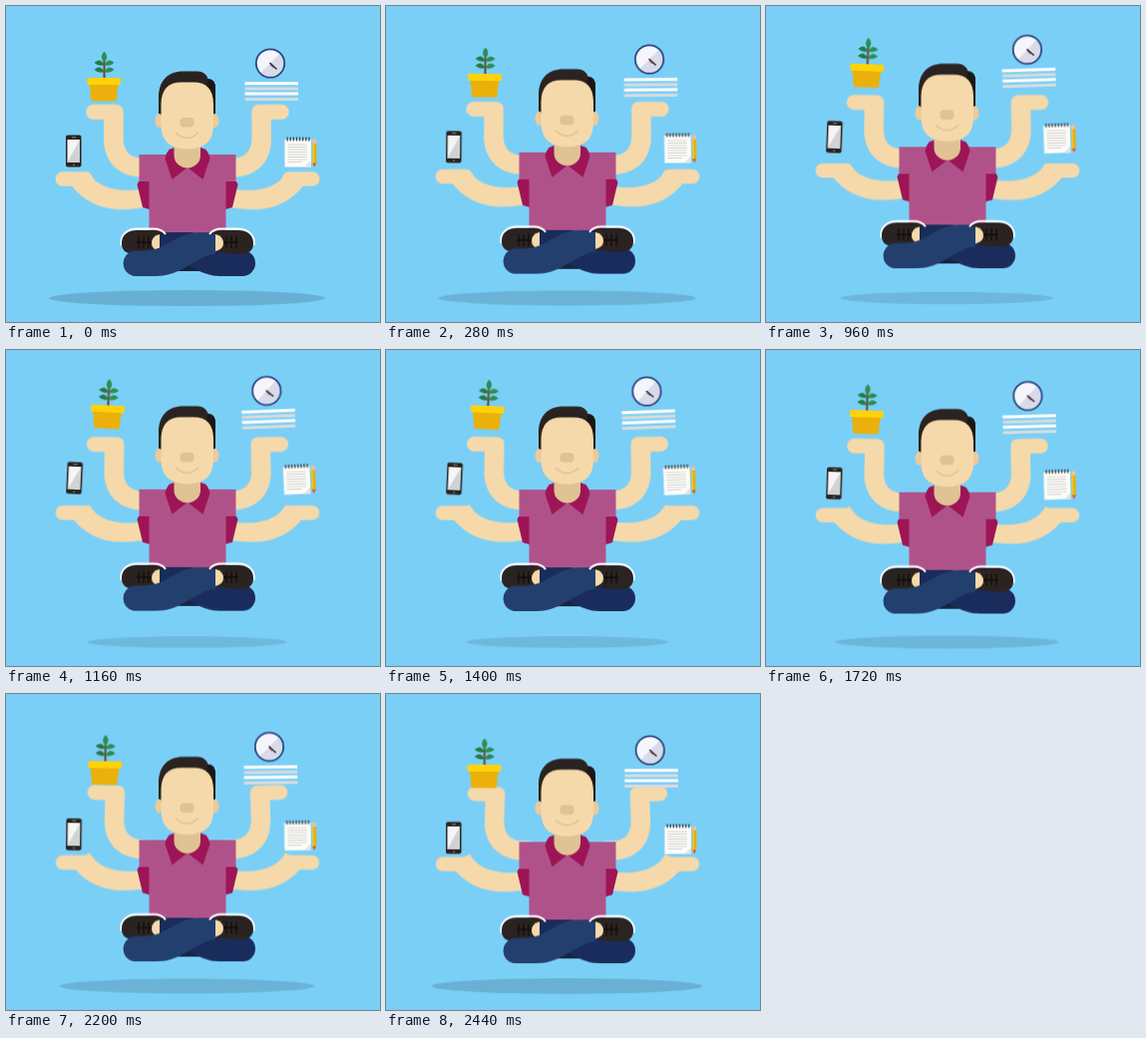
An HTML page without scripts for the animation above (2.52 s loop, 375 px wide and 317 px high).

```html
<!DOCTYPE html>
<html lang="en">
<head>
<meta charset="utf-8">
<title>Multitasking meditation</title>
<style>
  html, body { margin: 0; width: 100%; height: 100%; overflow: hidden; background: #7acff7; }
  svg { display: block; width: 375px; height: 317px; }

  .float { animation: float 1260ms linear infinite alternate; transform-origin: var(--pivot, 0 0); }
  @keyframes float {
    from { transform: none; }
    to { transform: translate(var(--x, 0px), var(--y, 0px)) rotate(var(--turn, 0deg)) scale(var(--size, 1)); opacity: var(--fade, 1); }
  }

  .shadow { --pivot: 181.5px 293px; --size: .7; --fade: .68; }
  .body { --y: -10px; }
  .upper { --pivot: 133px 160px; --turn: 3.8deg; }
  .lower { --pivot: 140px 190px; --turn: 3.8deg; }
  .hand { --x: .7px; --y: -5px; }
  .plant { --pivot: 98px 84px; --x: 3.6px; --y: -18px; --turn: 3.2deg; }
  .phone { --pivot: 68px 145px; --x: 1px; --y: -18.5px; --turn: 3deg; }
  .clock { --pivot: 265px 57.5px; --x: -4px; --y: -18px; --turn: -3deg; }
  .papers { --pivot: 266px 86px; --x: -3.2px; --y: -17.7px; --turn: -2.4deg; }
  .notes { --pivot: 295px 147px; --x: -1.2px; --y: -18.5px; --turn: -2.8deg; }

  .skin { fill: #f5d9aa; }
  .shade { fill: #e0c294; }
  .shirt { fill: #b0528a; }
  .trim { fill: #9d1556; }
  .dark { fill: #2b2321; }
</style>
</head>
<body>
<svg viewBox="0 0 375 317">
  <defs>
    <g id="arms">
      <path class="skin float upper" d="M87.5 99.5H110Q117.5 99.5 117.5 107V133C117.5 146 124 152 134 153H146V172H134C112 171 98 156 98 134V114.5H87.5A7.5 7.5 0 0 1 87.5 99.5Z"/>
      <path class="skin float lower" d="M83 168C93 184 112 189 146 183V201C108 210 82 203 65 180Z"/>
      <rect class="skin float hand" x="49.5" y="166.5" width="37.5" height="14.5" rx="7.25"/>
      <path class="trim" d="M133 176H144V204L137 202L131.5 179Z"/>
    </g>
    <path id="collar" class="trim" d="M169 142L163.500 144Q160 148 159.500 153L166.500 174L182 162Z"/>
    <g id="shoe">
      <path d="M115.500 240C114 229 122 223.500 132 223.500H148Q156 223.500 160 229" fill="none" stroke="#fff" stroke-width="2"/>
      <path class="dark" d="M116 238C116 229 123 225 131 225H148Q155 225 158 229H154V246Q142 249 130 249C120 249 116 245 116 238Z"/>
      <path d="M133 231V243M138 231V243M143 231V243M131 237H147" fill="none" stroke="#120e0d" stroke-width="1.300"/>
      <path class="skin" d="M154 229Q146 231 146 238Q146 244 154 246Z"/>
    </g>
    <path id="leaf" d="M98.500 66Q103 58 108.500 64Q104 68 98.500 66Z"/>
  </defs>

  <ellipse class="float shadow" cx="181.5" cy="293" rx="138.5" ry="8" fill="#69b0d3"/>

  <g class="float body">
    <use href="#arms"/>
    <use href="#arms" transform="matrix(-1 0 0 1 364 0)"/>
    <path class="shirt" d="M133.500 149H230.500V176H220.500V229H143.500V176H133.500Z"/>

    <path d="M168 258H198V266H168Z" fill="#17233f"/>
    <path d="M153 227H185C197 227 215 245 237 245A13 13 0 0 1 237 271H215C195 271 185 258 153 250Z" fill="#1a2c5b"/>
    <use href="#shoe"/>
    <path d="M210 227.500V249C200 249 190 257 180 262C170 268 160 271 150 271H128A13 13 0 0 1 128 245.500H138C160 245 165 233 185 228Q195 226.500 210 227.500Z" fill="#233f6e"/>
    <use href="#shoe" transform="matrix(-1 0 0 1 364 0)"/>

    <use href="#collar"/>
    <use href="#collar" transform="matrix(-1 0 0 1 364 0)"/>
    <path class="shade" d="M168.500 136H195V150A13.250 12.500 0 0 1 168.500 150Z"/>
    <path class="dark" d="M153 110V92C153 75 162 65.500 178 65.500H192Q200 65.500 202.500 73Q210 73 210 83V110Z"/>
    <path d="M202.500 73Q210 73 210 83V108H207V88Q205 82 201 80Z" fill="#1c1716"/>
    <ellipse cx="153.500" cy="115" rx="4" ry="7" fill="#ecca9a"/>
    <ellipse cx="209.500" cy="115" rx="4" ry="7" fill="#ecca9a"/>
    <path class="skin" d="M155.500 98Q156 76.500 176 76.500H188Q207.500 76.500 208 98V121Q207 143.500 182 143.500Q156.500 143.500 155.500 121Z"/>
    <rect class="shade" x="174.500" y="112" width="14" height="9.500" rx="4"/>
    <path d="M170 127Q181.500 138 193 127" fill="none" stroke="#e0c294" stroke-width="1.500"/>
  </g>

  <g class="float plant">
    <path d="M98.500 53V73" stroke="#6b4528" stroke-width="2"/>
    <g fill="#2f8d53">
      <path d="M98.500 45.500Q104 51 98.500 56.500Q93 51 98.500 45.500Z"/>
      <use href="#leaf"/>
      <use href="#leaf" y="-7"/>
    </g>
    <g fill="#267a48" transform="matrix(-1 0 0 1 197 0)">
      <use href="#leaf"/>
      <use href="#leaf" y="-7"/>
    </g>
    <path d="M83.500 77H112.500L110.500 95.500H85.500Z" fill="#ebb00b"/>
    <rect x="81.500" y="72" width="33.500" height="7" fill="#ffd20a"/>
  </g>

  <g class="float phone">
    <rect class="dark" x="60" y="129.500" width="15.500" height="32" rx="2"/>
    <path d="M61.500 134H74V157H61.500Z" fill="#f5f5f6"/>
    <path d="M74 134V157H61.500Z" fill="#d0d2d4"/>
    <path d="M66 131.800H70M67 159.200H69" stroke="#8b8786"/>
  </g>

  <g class="float clock">
    <circle cx="265" cy="57.500" r="14.300" fill="#f4f6fb"/>
    <path d="M275 47.500A14.200 14.200 0 0 1 255 67.500Z" fill="#d7dbea"/>
    <circle cx="265" cy="57.500" r="14.200" fill="none" stroke="#2c4680" stroke-width="1.800"/>
    <path d="M264.500 57L271.500 63.500" stroke="#2b2321" stroke-width="1.400"/>
    <path d="M265 59L268 62" stroke="#c8455a"/>
  </g>

  <g class="float papers" stroke-width="3">
    <path d="M239.500 77.800H293M239.500 88H293" stroke="#fff"/>
    <path d="M239.500 83H293M239.500 93.500H293" stroke="#d8dbdd"/>
  </g>

  <g class="float notes">
    <path d="M279.500 134H306V161.500H279.500Z" fill="#fdfcf8"/>
    <path d="M306 155V161.500H299Z" fill="#e3e2df"/>
    <path d="M281.500 133.500H305" stroke="#4a4442" stroke-width="4" stroke-dasharray="1.300 1.800"/>
    <path d="M282.500 139H302M282.500 141.500H302M282.500 144H302M282.500 146.500H302M282.500 149H302M282.500 151.500H302M282.500 154H302M282.500 156.500H297" stroke="#c9c9c9" stroke-width=".8"/>
    <path d="M307.300 138H311.300V157L309.300 161.500L307.300 157Z" fill="#f4c51b"/>
    <path d="M309.300 138H311.300V157H309.300Z" fill="#e2a914"/>
    <path d="M307.300 134.500Q309.300 132.500 311.300 134.500V138H307.300Z" fill="#edc0a0"/>
    <path d="M307.300 157.500H311.300L309.300 161.800Z" fill="#d9532c"/>
  </g>
</svg>
</body>
</html>
```
